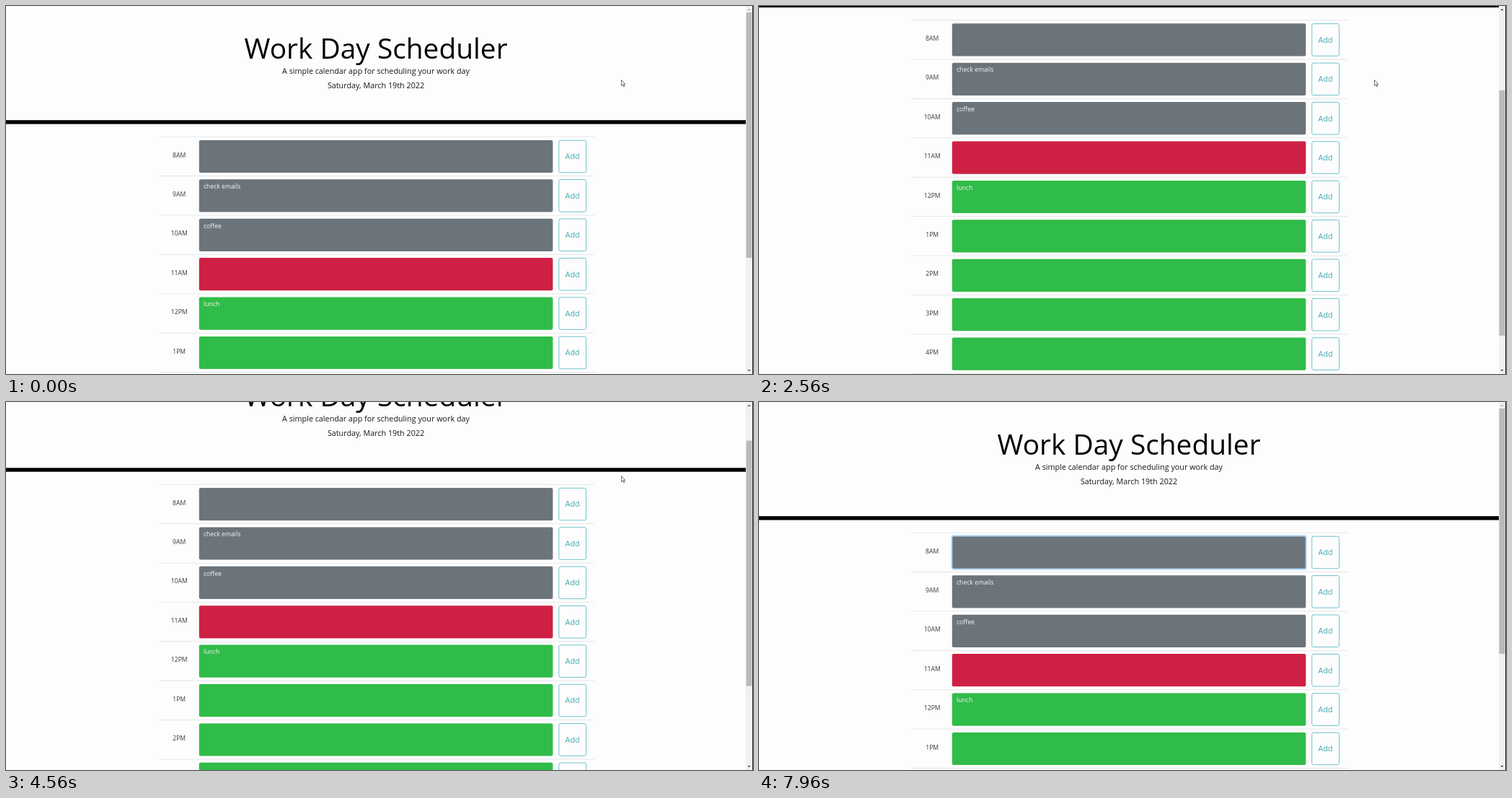
Recreate the animation shown at these times as an HTML page. Size 1036 px wide and 510 px high, loop 8 s.

```html
<!DOCTYPE html>
<html lang="en">
<head>
<meta charset="utf-8">
<title>Work Day Scheduler</title>
<style>
  html, body { margin: 0; width: 100%; height: 100%; overflow: hidden; background: #fdfdfd; }
  svg { display: block; width: 100%; height: 100%; font-family: "Open Sans", "Noto Sans", sans-serif; }
  .mid { text-anchor: middle; }
  .hour { font-size: 8.63px; fill: #33383c; }
  .note { font-size: 8.63px; fill: #f6f7f7; }
  .add { font-size: 10.8px; fill: #45a9b2; }
  .lead { font-size: 10.79px; fill: #16191c; }
</style>
</head>
<body>
<svg id="stage" viewBox="0 0 1036 510">
  <rect width="1036" height="510" fill="#fdfdfd"/>
  <g id="page">
    <text class="mid" x="513" y="73" font-size="38.85" fill="#000">Work Day Scheduler</text>
    <text class="mid lead" x="513" y="94">A simple calendar app for scheduling your work day</text>
    <text class="mid lead" x="513" y="113.5">Saturday, March 19th 2022</text>
    <rect y="158.2" width="1026" height="5.4" fill="#000"/>
    <g id="rows"></g>
    <rect id="ring" x="267.5" y="185.5" width="491.2" height="46" rx="2.6" fill="none" stroke="#a6d0f2" stroke-width="1.8"/>
    <rect id="caret" x="274.4" y="189.5" width="0.8" height="12" fill="#e4e7e9"/>
  </g>
  <rect x="1026" width="9" height="510" fill="#f1f1f1"/>
  <rect id="thumb" x="1026.6" width="7.8" height="340" fill="#bababa"/>
  <path id="up" d="M1028.5 6L1030.5 3.8L1032.5 6Z"/>
  <path id="down" d="M1028.5 504L1030.5 506.2L1032.5 504Z"/>
  <rect x="1035" width="1" height="510" fill="#2b2b2b"/>
  <path id="pointer" d="M0.5 0.5V8.6L2.4 6.9L3.7 9.8L4.9 9.3L3.6 6.4H5.8Z" fill="#fff" stroke="#333" stroke-width="0.7"/>
</svg>
<script>
const LOOP = 8000, TOP = 181.2, PITCH = 54.4, MAX_SCROLL = 228;
const NS = "http://www.w3.org/2000/svg";
const $ = id => document.getElementById(id);
const rows = $("rows");

const GRAY = "#6c747b", RED = "#ce2045", GREEN = "#30bc48";
const notes = { 9: "check emails", 10: "coffee", 12: "lunch" };

// [time, scroll offset]: wheel notches of about 54 px
const scrollSteps = [
  [0, 0], [1830, 20], [1900, 44], [1960, 53.9], [2230, 107.8], [2560, 161.6],
  [2830, 192], [2900, 215.5], [3100, 227.8], [3160, MAX_SCROLL],
  [3900, 208], [3960, 184], [4030, 174.4], [4300, 120.7], [4560, 66.9],
  [4700, 44], [4760, 22], [4830, 13], [4960, 0]
];

function add(tag, attrs, text) {
  const el = document.createElementNS(NS, tag);
  for (const key in attrs) el.setAttribute(key, attrs[key]);
  if (text) el.textContent = text;
  rows.appendChild(el);
}

function rule(y) {
  add("rect", { x: 211.5, y: y - 0.4, width: 604.5, height: 0.8, fill: "#dfe2e5" });
}

function buildRow(hour, index) {
  const y = TOP + index * PITCH;
  const label = (hour > 12 ? hour - 12 : hour) + (hour < 12 ? "AM" : "PM");
  const fill = hour < 11 ? GRAY : hour === 11 ? RED : GREEN;
  rule(y);
  add("text", { class: "mid hour", x: 240.2, y: y + 28.4 }, label);
  add("rect", { x: 267.8, y: y + 4.7, width: 490.6, height: 45.2, rx: 2, fill });
  if (notes[hour]) add("text", { class: "note", x: 274, y: y + 17.5 }, notes[hour]);
  add("rect", { x: 766.8, y: y + 5, width: 37.8, height: 44.6, rx: 2.2,
    fill: "none", stroke: "#6fc3cb", "stroke-width": 1 });
  add("text", { class: "mid add", x: 785.6, y: y + 31.2 }, "Add");
}

for (let i = 0; i < 10; i++) buildRow(8 + i, i);
rule(TOP + 10 * PITCH);

function scrollAt(t) {
  let value = 0;
  for (const [time, offset] of scrollSteps) if (t >= time) value = offset;
  return value;
}

function movePointer(t) {
  const step = t < 5430 ? 0 : Math.min(8, Math.floor((t - 5430) / 66.25) + 1);
  const p = step / 8, ease = p * p * (3 - 2 * p);
  const x = 853 - 153 * ease, y = 102 + 98 * ease;
  const overField = x < 758 && y > 186;
  $("pointer").setAttribute("transform", `translate(${x} ${y})`);
  $("pointer").setAttribute("visibility", overField ? "hidden" : "visible");
}

function draw(t) {
  const scroll = scrollAt(t);
  $("page").setAttribute("transform", `translate(0 ${-scroll})`);
  $("thumb").setAttribute("y", 9 + scroll * 2 / 3);
  $("up").setAttribute("fill", scroll > 0 ? "#404040" : "#a3a3a3");
  $("down").setAttribute("fill", scroll < MAX_SCROLL ? "#404040" : "#a3a3a3");
  movePointer(t);
  $("ring").setAttribute("opacity", t < 6100 ? 0 : t < 6230 ? 0.6 : 1);
  const caretOn = t >= 6100 && (t < 6760 || (t >= 7300 && t < 7830));
  $("caret").setAttribute("opacity", caretOn ? 1 : 0);
}

const start = performance.now();
function frame() {
  draw((performance.now() - start) % LOOP);
  requestAnimationFrame(frame);
}
draw(0);
requestAnimationFrame(frame);
</script>
</body>
</html>
```
